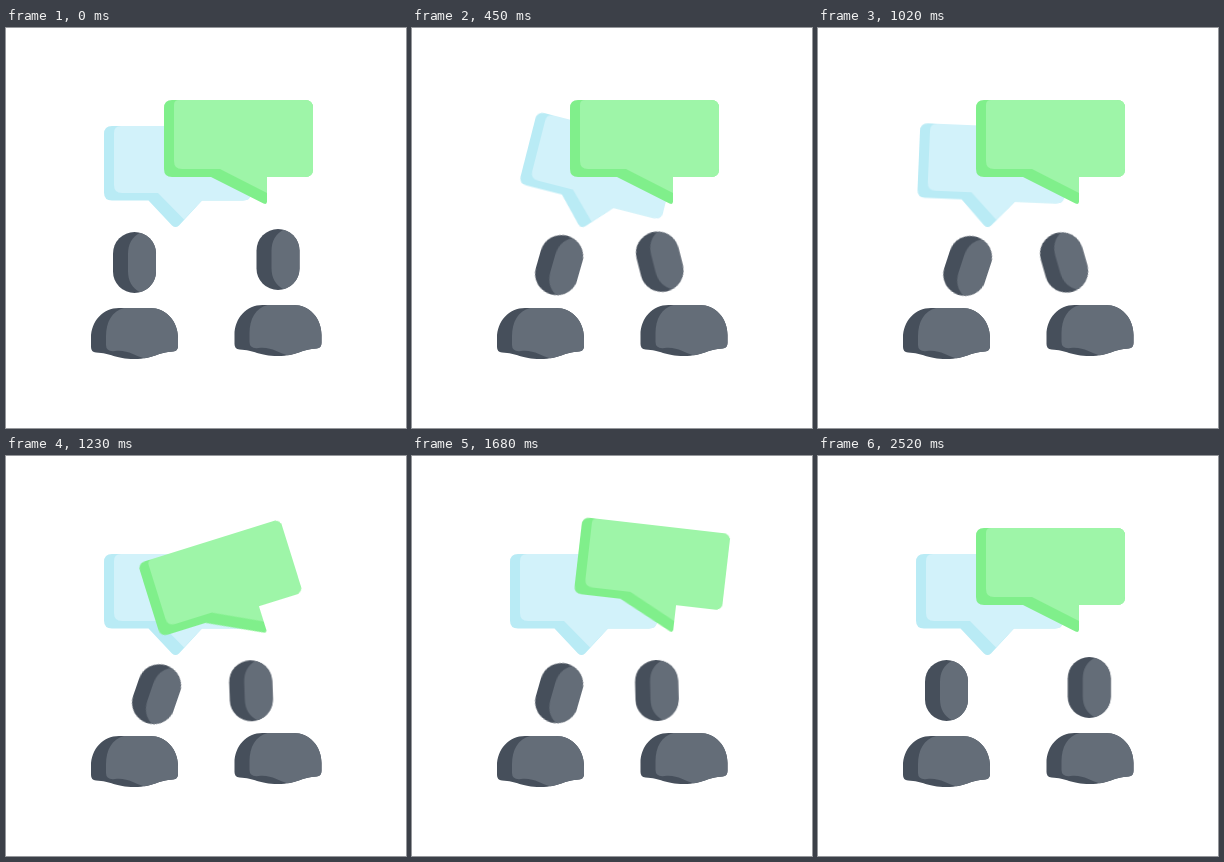
An HTML page that plays this animation: 400x400 px, repeating every 2.55 s.

```html
<!DOCTYPE html>
<html lang="en">
<head>
<meta charset="utf-8">
<title>Two people talking</title>
<style>
  html, body { margin: 0; width: 100%; height: 100%; overflow: hidden; background: #fff; }
  svg { display: block; width: 100vw; height: 100vh; }

  .blue, .green, .left, .right {
    animation: 2550ms cubic-bezier(.333, 0, .667, 1) infinite;
  }
  .blue  { transform-origin: 170px 199px; animation-name: blue; }
  .green { transform-origin: 261px 176px; animation-name: green; }
  .left  { transform-origin: 128.5px 302px; animation-name: left; }
  .right { transform-origin: 272px 231.5px; animation-name: right; }

  .dark { fill: #464f5b; }
  .light { fill: #646d78; }

  @keyframes blue {
    0% { transform: rotate(0deg); }
    7.06% { transform: rotate(-20.5deg); }
    18.63% { transform: rotate(15deg); }
    27.84% { transform: rotate(-9deg); }
    37.45% { transform: rotate(3deg); }
    46.67%, 100% { transform: rotate(0deg); }
  }
  @keyframes green {
    0%, 42.47% { transform: rotate(0deg); }
    50% { transform: rotate(-20deg); }
    62.16% { transform: rotate(15deg); }
    71.57% { transform: rotate(-9deg); }
    81.37% { transform: rotate(3deg); }
    90.59%, 100% { transform: rotate(0deg); }
  }
  @keyframes left {
    0% { transform: rotate(0deg); }
    15% { transform: rotate(15.7deg); animation-timing-function: linear; }
    48.2% { transform: rotate(19deg); }
    64.3%, 81.5% { transform: rotate(16deg); }
    98%, 100% { transform: rotate(0deg); }
  }
  @keyframes right {
    0% { transform: translate(0, 0) rotate(0deg); }
    15% { transform: translate(-24.3px, 2.2px) rotate(-14deg); }
    29.4% { transform: translate(-25px, 2.8px) rotate(-17deg); }
    41% { transform: translate(-26px, 3px) rotate(-16deg); }
    48.2% { transform: translate(-27px, 3.3px) rotate(-2deg); }
    65.9% { transform: translate(-27.2px, 3px) rotate(-1.5deg); }
    81.2% { transform: translate(-3.3px, .2px) rotate(-1deg); }
    98.8% { transform: translate(-.8px, 0) rotate(0deg); }
    100% { transform: translate(0, 0) rotate(0deg); }
  }
</style>
</head>
<body>
<svg viewBox="0 0 400 400">
  <defs>
    <g id="head">
      <rect class="dark" x="107" y="204" width="43" height="61" rx="21.5"/>
      <path class="light" d="M134 204.7C126 209 122 216 122 226V243C122 253 126 260 134 264.3A21.5 21.5 0 0 0 150 243.500V225.500A21.5 21.5 0 0 0 134 204.700Z"/>
    </g>
    <g id="body">
      <path class="dark" d="M85 310C85 293 97 280 113 280H144C160 280 172 293 172 310V318Q172 323 167 323.500C152 324 148 331 128.500 331C109 331 105 325 90 324.500Q85 324 85 319Z"/>
      <path class="light" d="M100 308C100 294 106 283 118 280H144C160 280 172 293 172 310V318Q172 323 167 323.500C154 324 149 329 138 330.300C129 328 122 321.500 109 323Q100 324 100 317Z"/>
    </g>
  </defs>

  <g class="blue">
    <path fill="#b9ebf5" d="M106 98H237Q245 98 245 106V164.500Q245 172.500 237 172.500H196L173 197.500Q169.500 200.500 166 197.500L142.500 172.500H106Q98 172.500 98 164.500V106Q98 98 106 98Z"/>
    <path fill="#d2f2fa" d="M115 98H237Q245 98 245 106V164.500Q245 172.500 237 172.500H196L178 191.500L152 165H116Q108 165 108 157V105Q108 98 115 98Z"/>
  </g>

  <g class="green">
    <path fill="#80ef8b" d="M166 72H299Q307 72 307 80V141Q307 149 299 149H261V173.500Q261 177 257.500 175.500L205 149H166Q158 149 158 141V80Q158 72 166 72Z"/>
    <path fill="#9ef5a8" d="M173 72H299Q307 72 307 80V141Q307 149 299 149H261V165L214 141H176Q168 141 168 133V77Q168 72 173 72Z"/>
  </g>

  <use href="#body"/>
  <use href="#body" x="143.500" y="-3"/>
  <g class="left"><use href="#head"/></g>
  <g class="right"><use href="#head" x="143.500" y="-3"/></g>
</svg>
</body>
</html>
```
